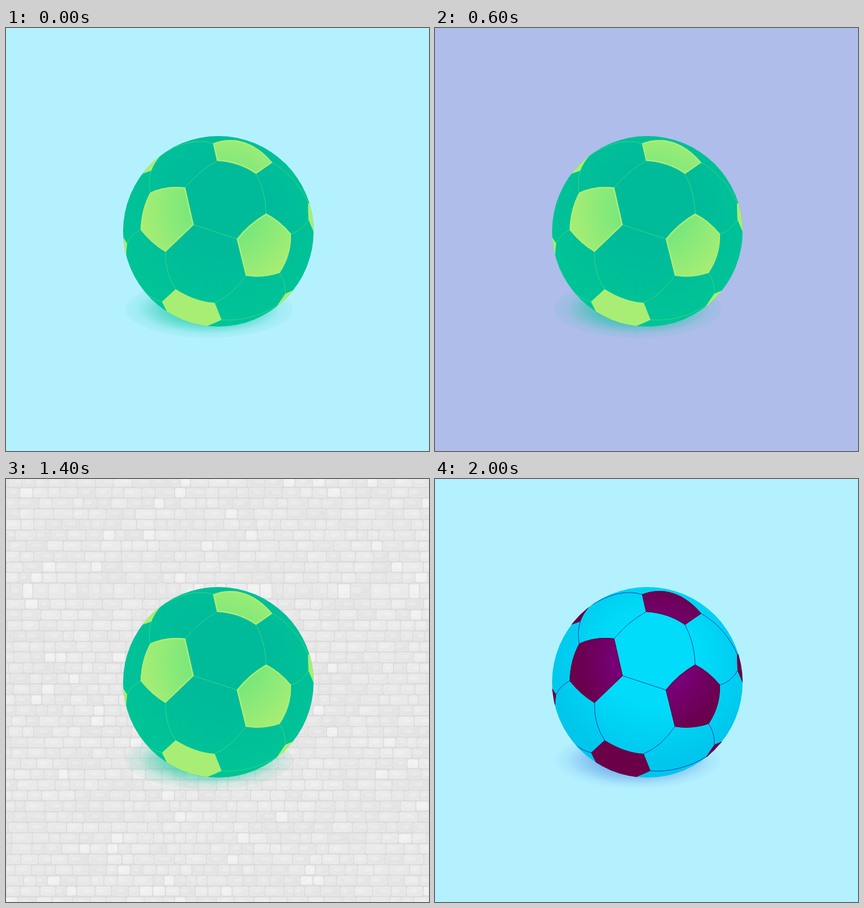
These frames come from a looping animation (748x748 px, 2200 ms). An HTML page with a canvas:

```html
<!DOCTYPE html>
<html lang="en">
<head>
<meta charset="utf-8">
<title>Football</title>
<style>
  html, body { margin: 0; width: 100%; height: 100%; overflow: hidden; background: #fff; }
  canvas { display: block; width: 100vw; height: 100vh; }
</style>
</head>
<body>
<canvas id="stage" width="748" height="748"></canvas>
<script>
const SIZE = 748;
const STEP = 200;
const ctx = document.getElementById('stage').getContext('2d');

const SKY = '#b4f1ff', WHITE = '#fefefe', LAVENDER = '#afbdea', BRICK = 'brick';

// Gradient stops are [radius, colour] around the highlight.
const themes = {
  green: {
    ball: [[80, '#00bb9a'], [200, '#00c497']],
    patch: [[45, '#72e67c'], [150, '#a8ee74']],
    edge: '#a8ee74', rim: '#a8ee74', rimWidth: 5,
    seam: '#3dd980', seamWidth: 0.9,
    shadow: '0,196,151', depth: 1, hem: 0.05
  },
  gray: {
    ball: [[0, '#5f5f5f'], [200, '#616161']],
    patch: [[45, '#adadad'], [150, '#b1b1b1']],
    edge: '#b1b1b1', rim: '#b4b4b4', rimWidth: 3,
    seam: '#999999', seamWidth: 0.9,
    shadow: '0,0,0', depth: 0.8, hem: 0.02
  },
  gold: {
    ball: [[76, '#ffffff'], [118, '#fbe0a9'], [150, '#f4d99e'], [195, '#e5cb90']],
    patch: [[40, '#bfa063'], [96, '#f1d699'], [142, '#f3d89c'], [158, '#c2a467']],
    edge: '#c0a264', rim: '#ffffff', rimWidth: 2.6, overlay: true,
    seam: '#7d5f22', seamWidth: 1.2, glow: true, dx: -1,
    shadow: '140,100,20', depth: 1, hem: 0
  },
  olive: {
    ball: [[85, '#f3f3f3'], [130, '#e9e9e9'], [160, '#dedede'], [200, '#d8d8d8']],
    patch: [[40, '#8a6f00'], [125, '#897400'], [165, '#858600']],
    edge: '#858500', seam: '#858888', seamWidth: 0.9,
    shadow: '110,110,110', depth: 0.4, hem: 0
  },
  blue: {
    ball: [[80, '#00dcfa'], [185, '#00c6ec']],
    patch: [[45, '#7c0083'], [125, '#6b0052'], [160, '#6b0048']],
    edge: '#6b0048', rim: '#6b0049', rimWidth: 4,
    seam: '#1438b8', seamWidth: 1,
    shadow: '70,130,222', depth: 0.9, hem: 0.02
  }
};

const scenes = [
  [SKY, 'green'], [WHITE, 'gray'], [SKY, 'blue'], [LAVENDER, 'green'],
  [WHITE, 'gold'], [LAVENDER, 'gold'], [LAVENDER, 'blue'], [BRICK, 'green'],
  [WHITE, 'gray'], [BRICK, 'olive'], [SKY, 'blue']
];

const ball = new Path2D();
ball.arc(375.5, 359.5, 168.5, 0, Math.PI * 2);

const patches = [
  'M366 204C400 190 440 200 471 238L442 258Q412 237 373 235Z',
  'M255 291Q283 278 317 282L332 348L282 396Q258 382 238 357Q239 320 255 291Z',
  'M460 328Q484 340 504 364Q505 402 484 433Q455 443 424 438L408 373Q430 345 460 328Z',
  'M300 462Q335 484 369 486L381 516Q366 523 348 530L290 512L276 484Z'
].map(d => new Path2D(d));

const edgePatches = [
  'M276 222Q262 238 257 252L240 258L235 240Z',
  'M534 311L540 308L550 365L544 360L535 339Z',
  'M207 370L214 381L212 402L200 400Z',
  'M494 470L508 464L500 490L479 492Z'
].map(d => new Path2D(d));

const innerSeams = new Path2D(
  'M373 235Q342 252 317 282M442 258Q459 289 460 328' +
  'M282 396Q281 434 300 462M424 438Q401 472 369 486');

const seams = new Path2D(
  'M332 348L408 373M255 291Q251 270 257 252M366 204Q326 192 275 224' +
  'M471 238Q514 263 535 311M504 364Q523 359 535 339M484 433Q495 450 494 470' +
  'M381 516Q431 520 480 491M238 357Q221 366 214 381M276 484Q261 480 249 471');
seams.addPath(innerSeams);

function seeded(seed) {
  return () => (seed = (seed * 16807) % 2147483647) / 2147483647;
}

function drawBrick(c, rnd, x, y, w, h) {
  const bright = w < 24 && rnd() > 0.72;
  const tone = bright ? 240 : 228 + Math.floor(rnd() * 8);
  const shade = v => `rgb(${v},${v},${v})`;
  const g = c.createLinearGradient(x, y, x + w * 0.3, y + h);
  g.addColorStop(0, shade(tone + 3));
  g.addColorStop(1, shade(tone - 1));
  const top = y + 1.4 + rnd(), bottom = y + h - 1.4 - rnd();
  c.fillStyle = g;
  c.beginPath();
  c.roundRect(x + 1.3, top, w - 2.6, bottom - top, 3);
  c.fill();
  c.strokeStyle = 'rgba(255,255,255,0.4)';
  c.lineWidth = 0.8;
  c.stroke();
  c.fillStyle = 'rgba(255,255,255,0.2)';
  c.beginPath();
  c.ellipse(x + w * (0.3 + rnd() * 0.4), y + h * 0.45, w * 0.25, h * 0.2, 0, 0, Math.PI * 2);
  c.fill();
}

// Each row runs out from x = 308 and is mirrored on both sides.
function buildWall() {
  const wall = document.createElement('canvas');
  wall.width = wall.height = SIZE;
  const c = wall.getContext('2d');
  const rnd = seeded(4127);
  c.fillStyle = '#dddddd';
  c.fillRect(0, 0, SIZE, SIZE);
  let y = -4;
  for (let row = 0; y < SIZE; row++) {
    const h = row === 10 ? 28 : 18.8;
    let x = 308 + (row % 2 ? 10 : 0);
    if (row % 2) drawBrick(c, rnd, 298, y, 20, h);
    while (x < SIZE) {
      const w = 18 + rnd() * 19;
      drawBrick(c, rnd, x, y, w, h);
      if (616 - x > 0) drawBrick(c, rnd, 616 - x - w, y, w, h);
      x += w;
    }
    y += h;
  }
  return wall;
}
const wall = buildWall();

function radial(stops) {
  const reach = 220;
  const g = ctx.createRadialGradient(385, 320, 0, 385, 320, reach);
  for (const [r, colour] of stops) g.addColorStop(r / reach, colour);
  return g;
}

function drawBackground(kind) {
  if (kind === BRICK) return ctx.drawImage(wall, 0, 0);
  ctx.fillStyle = kind;
  ctx.fillRect(0, 0, SIZE, SIZE);
}

function drawShadow({ shadow, depth, hem }) {
  ctx.save();
  ctx.translate(359, 497);
  ctx.scale(148, 51);
  const g = ctx.createRadialGradient(0, 0, 0, 0, 0, 1);
  g.addColorStop(0, `rgba(${shadow},${depth})`);
  g.addColorStop(0.6, `rgba(${shadow},${depth * 0.42})`);
  g.addColorStop(0.85, `rgba(${shadow},${depth * 0.11})`);
  g.addColorStop(1, `rgba(${shadow},${hem})`);
  ctx.fillStyle = g;
  ctx.beginPath();
  ctx.arc(0, 0, 1, 0, Math.PI * 2);
  ctx.fill();
  ctx.restore();
}

function stroke(path, colour, width) {
  ctx.strokeStyle = colour;
  ctx.lineWidth = width;
  ctx.stroke(path);
}

function drawPatch(path, fill, t) {
  ctx.fillStyle = fill;
  ctx.fill(path);
  if (!t.rim) return;
  ctx.save();
  if (!t.overlay) ctx.clip(path);
  stroke(path, t.rim, t.rimWidth);
  ctx.restore();
}

function drawBall(t) {
  ctx.save();
  ctx.translate(t.dx || 0, 0);
  ctx.lineJoin = 'round';
  ctx.fillStyle = radial(t.ball);
  ctx.fill(ball);
  ctx.clip(ball);
  if (t.glow) stroke(innerSeams, '#ffffff', 3.4);
  stroke(seams, t.seam, t.seamWidth);
  const fill = radial(t.patch);
  for (const p of patches) drawPatch(p, fill, t);
  for (const p of edgePatches) drawPatch(p, t.edge, t);
  ctx.restore();
}

function draw(time) {
  const [background, name] = scenes[Math.floor(time / STEP) % scenes.length];
  drawBackground(background);
  drawShadow(themes[name]);
  drawBall(themes[name]);
}

let start;
function tick(now) {
  start ??= now;
  draw(Math.max(0, now - start));
  requestAnimationFrame(tick);
}
draw(0);
requestAnimationFrame(tick);
</script>
</body>
</html>
```
